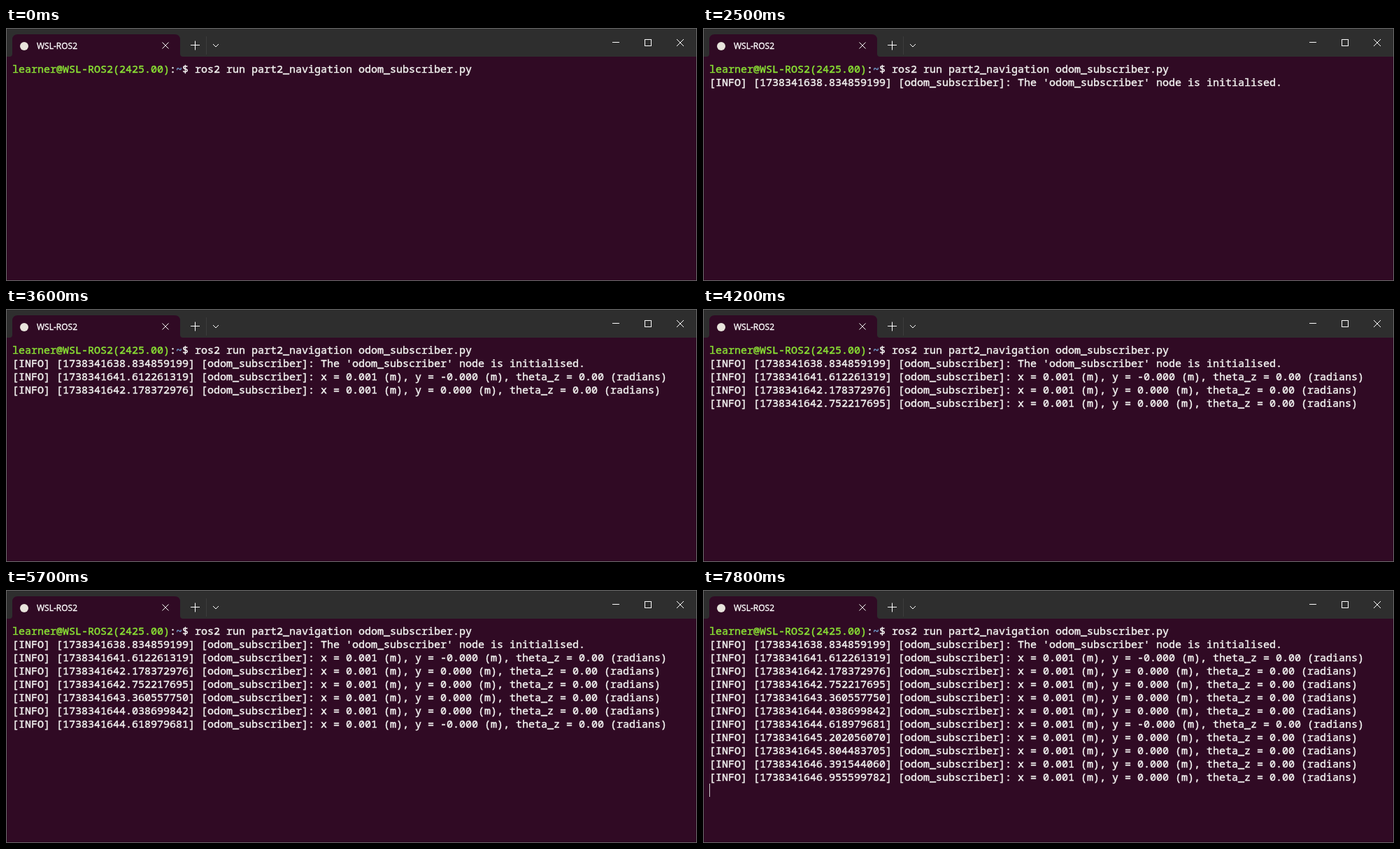
Animation of 988x362 px, one loop 8 s. Source, as an HTML page:

```html
<!DOCTYPE html>
<html lang="en">
<head>
<meta charset="utf-8">
<title>Terminal</title>
<style>
  html, body { margin: 0; width: 100%; height: 100%; overflow: hidden; background: #300a24; }
  svg { display: block; }
  .term { font: 500 15px "Noto Sans Mono", "DejaVu Sans Mono", monospace; fill: #f2f2f0; stroke: #f2f2f0; stroke-width: .45; }
  .tab { font: 500 12px "Open Sans", "Noto Sans", sans-serif; fill: #fff; stroke: #fff; stroke-width: .35; }
  .user { fill: #8ae234; stroke: #8ae234; }
  .path { fill: #729fcf; stroke: #729fcf; }
  .icon { fill: none; stroke: #fff; stroke-width: 1; }
</style>
</head>
<body>
<svg width="988" height="362" viewBox="0 0 988 362">
  <rect width="988" height="362" fill="#300a24"/>
  <rect width="988" height="41" fill="#2e2e2e"/>
  <path d="M1 41h4q4 0 4-4V17q0-8 8-8H241q8 0 8 8V37q0 4 4 4z" fill="#300a24"/>
  <circle cx="26" cy="26" r="6" fill="#e8e4dc"/>
  <text class="tab" x="44" y="30">WSL-ROS2</text>
  <path d="M286.5 12V38" stroke="#3d3d3d"/>
  <g class="icon">
    <path d="M223.5 20.5l9 9m0-9l-9 9"/>
    <path d="M264 24.5h13m-6.5-6v13"/>
    <path d="M296 23l4 4l4-4"/>
    <path d="M867 20.5h10"/>
    <rect x="913.5" y="16.5" width="9" height="9"/>
    <path d="M959 16l10 10m0-10l-10 10"/>
  </g>
  <g class="term" id="screen">
    <text x="9" y="64"><tspan class="user">learner@WSL-ROS2(2425.00)</tspan>:<tspan class="path">~</tspan>$ ros2 run part2_navigation odom_subscriber.py</text>
  </g>
  <rect id="cursor" x="9" width="1" height="19" fill="#ccc"/>
  <rect x=".5" y=".5" width="987" height="361" fill="none" stroke="#6b6b6b"/>
</svg>
<script>
const LOOP = 8000, TOP = 49, ROW = 19, BASE = 15;
const screen = document.getElementById('screen');
const cursor = document.getElementById('cursor');

// [time shown, time the cursor goes dark, stamp, sign of y]
const log = [
  [100, 500, '1738341638.834859199'],
  [2700, 3000, '1738341641.612261319', '-'],
  [3200, 3600, '1738341642.178372976', ''],
  [3800, 4200, '1738341642.752217695', ''],
  [4400, 4700, '1738341643.360557750', ''],
  [5000, 5200, '1738341644.038699842', ''],
  [5600, 5700, '1738341644.618979681', '-'],
  [6100, 6200, '1738341645.202056070', ''],
  [6700, 6800, '1738341645.804483705', ''],
  [7300, 7800, '1738341646.391544060', ''],
  [7800, 8000, '1738341646.955599782', '']
];

const message = sign => sign === undefined
  ? "The 'odom_subscriber' node is initialised."
  : `x = 0.001 (m), y = ${sign}0.000 (m), theta_z = 0.00 (radians)`;

const lines = log.map(([, , stamp, sign], i) => {
  const line = document.createElementNS('http://www.w3.org/2000/svg', 'text');
  line.setAttribute('x', 9);
  line.setAttribute('y', TOP + BASE + ROW * (i + 1));
  line.textContent = `[INFO] [${stamp}] [odom_subscriber]: ${message(sign)}`;
  screen.append(line);
  return line;
});

const show = (el, on) => el.setAttribute('visibility', on ? 'visible' : 'hidden');

function draw(t) {
  const count = log.filter(([from]) => t >= from).length;
  lines.forEach((line, i) => show(line, i < count));
  // While the first line waits, the cursor keeps blinking.
  const blink = count === 1 && t >= 1000 && Math.floor(t / 500) % 2 === 0;
  show(cursor, count > 0 && (t < log[count - 1][1] || blink));
  cursor.setAttribute('y', TOP + ROW * (count + 1));
}

const start = performance.now();
function tick() {
  draw((performance.now() - start) % LOOP);
  requestAnimationFrame(tick);
}
tick();
</script>
</body>
</html>
```
